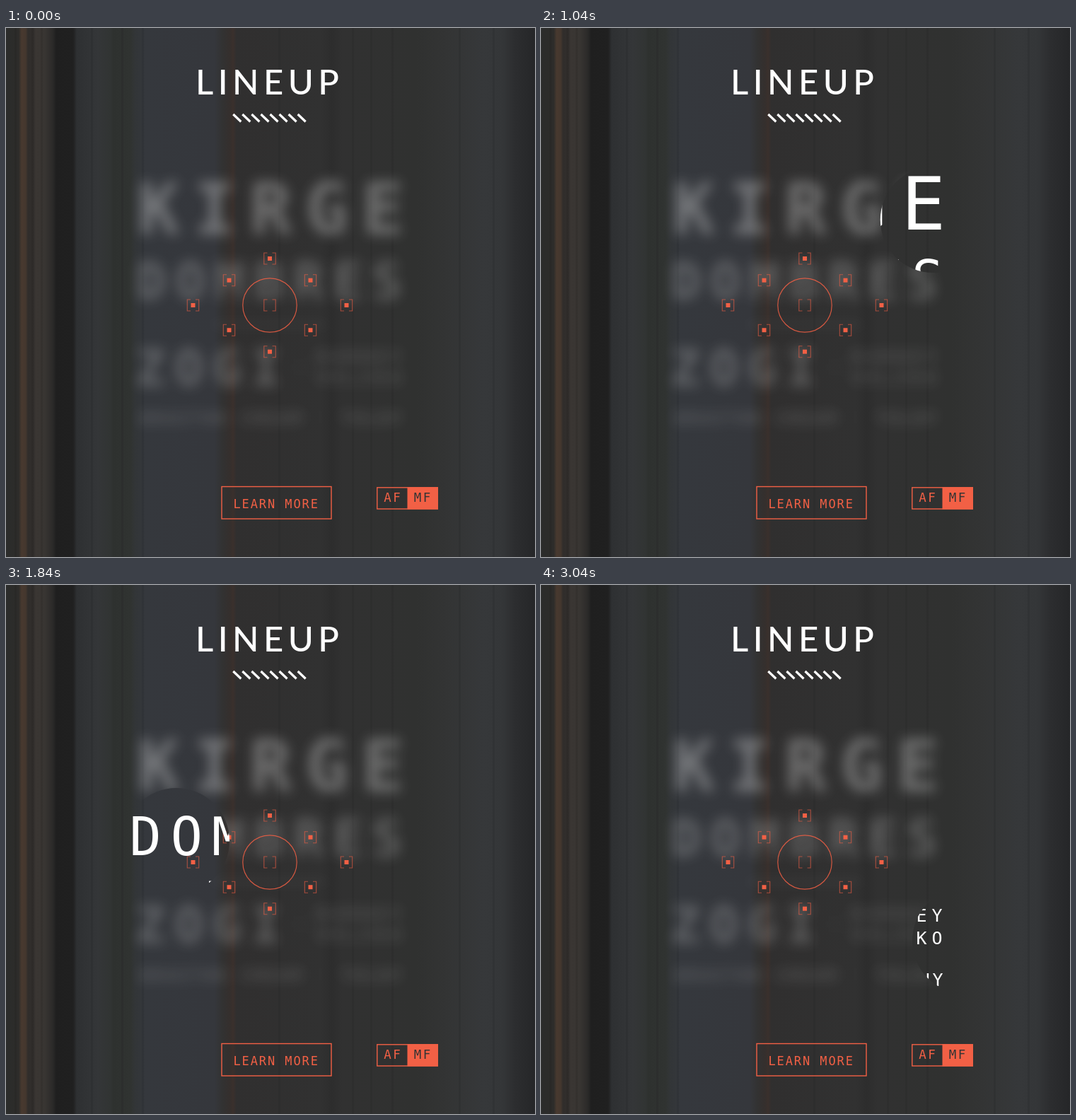
Recreate the animation shown at these times as an HTML page with a canvas. Size 748 px wide and 748 px high, loop 3120 ms.

```html
<!DOCTYPE html>
<html lang="en">
<head>
<meta charset="utf-8">
<title>Lineup</title>
<style>
  html, body { margin: 0; width: 100%; height: 100%; overflow: hidden; background: #303030; }
  canvas { display: block; }
</style>
</head>
<body>
<canvas id="stage" width="748" height="748"></canvas>
<script>
const SIZE = 748, LOOP = 3120, STEP = 80, LENS = 75;
const MONO = '"DejaVu Sans Mono", monospace';
const ORANGE = '#f26045';
const stage = document.getElementById('stage').getContext('2d');

function layer() {
  const c = document.createElement('canvas');
  c.width = c.height = SIZE;
  return c.getContext('2d');
}

// Letters centred on an even pitch, starting at centre x
function row(g, text, x, y, pitch, size, weight = 400) {
  g.font = `${weight} ${size}px ${MONO}`;
  g.textAlign = 'center';
  [...text].forEach((ch, i) => g.fillText(ch, x + i * pitch, y));
}

function poster(g, weight, shade) {
  const ink = a => { g.fillStyle = `rgba(255,255,255,${shade ? a : 1})`; };
  ink(0.32);
  row(g, 'KIRGE', 208, 285, 83.2, 104, weight);
  ink(0.24);
  row(g, 'DOMBRES', 197, 381.5, 58.3, 75, weight);
  row(g, 'ZOGI', 196, 509.5, 57, 72, weight);
  ink(0.2);
  row(g, 'DORNEY', 450, 476, 22, 25, weight);
  row(g, 'VELIKO', 450, 508, 22, 25, weight);
  row(g, 'BRASTON CREAM', 188, 567, 18.65, 25, weight);
  row(g, 'TOLNY', 486.4, 567, 18.65, 25, weight);
  ink(0.16);
  g.fillRect(287, 418.5, 172, 2.5);
  g.fillRect(416, 471, 2, 24);
  g.fillRect(448, 548, 1.5, 19);
}

function backdrop(g) {
  const stops = [
    [0, '#2b2c2b'], [18, '#2d2c2a'], [22, '#48392f'], [28, '#44372e'],
    [31, '#302d2b'], [39, '#312e2c'], [42, '#3a3633'], [55, '#383532'],
    [66, '#2b2a29'], [71, '#1f1f1f'], [95, '#202020'], [100, '#2e3032'],
    [130, '#343638'], [148, '#313433'], [152, '#2e312f'], [176, '#303331'],
    [182, '#323537'], [198, '#35383d'], [295, '#35373c'], [306, '#323232'],
    [317, '#352f2d'], [321, '#3a302c'], [326, '#302f2f'], [445, '#313131'],
    [460, '#2d2d2d'], [476, '#313131'], [580, '#303130'], [622, '#333434'],
    [676, '#36383a'], [702, '#343638'], [718, '#2d2e30'], [748, '#252628']
  ];
  const fill = g.createLinearGradient(0, 0, SIZE, 0);
  stops.forEach(([x, c]) => fill.addColorStop(x / SIZE, c));
  g.fillStyle = fill;
  g.fillRect(0, 0, SIZE, SIZE);
  g.fillStyle = 'rgba(0,0,0,0.07)';
  for (const x of [12, 36, 49, 120, 163, 192, 385, 489, 515, 545, 640, 688]) g.fillRect(x, 0, 3, SIZE);
}

function heading(g) {
  g.fillStyle = g.strokeStyle = '#fff';
  g.font = '500 49px Lato, sans-serif';
  g.textAlign = 'left';
  const text = 'LINEUP';
  const gap = (203 - g.measureText(text).width) / (text.length - 1);
  let x = 268;
  for (const ch of text) {
    g.fillText(ch, x, 94);
    x += g.measureText(ch).width + gap;
  }
  g.lineWidth = 3.2;
  for (let i = 0; i < 8; i++) {
    const left = 321.3 + i * 13.05;
    g.beginPath();
    g.moveTo(left, 122);
    g.lineTo(left + 11, 132.5);
    g.stroke();
  }
}

function bracket(g, x, y, dot) {
  g.strokeStyle = 'rgba(242,96,69,0.62)';
  g.lineWidth = 1.1;
  for (const s of [-1, 1]) {
    g.beginPath();
    g.moveTo(x + s * 3.5, y - 8);
    g.lineTo(x + s * 8.2, y - 8);
    g.lineTo(x + s * 8.2, y + 8);
    g.lineTo(x + s * 3.5, y + 8);
    g.stroke();
  }
  if (dot) {
    g.fillStyle = ORANGE;
    g.fillRect(x - 3, y - 3, 6, 6);
  }
}

function finder(g) {
  const cx = 373, cy = 392;
  bracket(g, cx, cy, false);
  bracket(g, cx, 326, true);
  bracket(g, cx, 457.7, true);
  for (const s of [-1, 1]) {
    bracket(g, cx + s * 108.5, cy, true);
    bracket(g, cx + s * 57.5, 356.7, true);
    bracket(g, cx + s * 57.5, 427.2, true);
  }
  g.strokeStyle = 'rgba(242,96,69,0.85)';
  g.lineWidth = 1.2;
  g.beginPath();
  g.arc(cx, cy, 38.2, 0, 7);
  g.stroke();
}

function buttons(g) {
  g.strokeStyle = g.fillStyle = ORANGE;
  g.lineWidth = 1.4;
  g.strokeRect(305, 648.5, 155, 45.5);
  row(g, 'LEARN MORE', 326.5, 678.5, 12.15, 17);
  g.strokeRect(524.8, 649.8, 85.5, 30.2);
  g.fillRect(567.5, 649.2, 43.5, 31.4);
  row(g, 'AF', 539.5, 670, 13, 17.5);
  g.fillStyle = '#343434';
  row(g, 'MF', 582, 670, 13, 17.5);
}

const base = layer(), ui = layer(), sharp = layer(), soft = layer(), haze = layer();
backdrop(base);
heading(ui);
finder(ui);
buttons(ui);
poster(sharp, 400, false);

// The unfocused copy lies slightly smaller around the middle
soft.translate(373, 410);
soft.scale(0.953, 0.953);
soft.translate(-373, -410);
poster(soft, 700, true);
haze.filter = 'blur(9px)';
haze.drawImage(soft.canvas, 0, 0);

// Lens route: time, x, y
const route = [
  [0, -10, 213], [400, 221, 225], [800, 450, 239], [1060, 558, 275],
  [1280, 510, 335], [1560, 370, 350], [1840, 241, 362], [2080, 155, 412],
  [2320, 185, 478], [2640, 365, 495], [3040, 600, 503], [3120, 647, 505]
];

function slope(i, k) {
  const a = route[Math.max(i - 1, 0)], b = route[Math.min(i + 1, route.length - 1)];
  return (b[k] - a[k]) / (b[0] - a[0]);
}

function lensAt(t) {
  let i = 0;
  while (t >= route[i + 1][0]) i++;
  const a = route[i], b = route[i + 1], span = b[0] - a[0];
  const u = (t - a[0]) / span, v = 1 - u;
  return [1, 2].map(k =>
    a[k] * (1 + 2 * u) * v * v + slope(i, k) * span * u * v * v +
    b[k] * u * u * (3 - 2 * u) - slope(i + 1, k) * span * u * u * v);
}

function clipped(image, x, y, outside) {
  stage.save();
  stage.beginPath();
  if (outside) stage.rect(0, 0, SIZE, SIZE);
  stage.moveTo(x + LENS, y);
  stage.arc(x, y, LENS, 0, Math.PI * 2);
  stage.clip('evenodd');
  stage.drawImage(image.canvas, 0, 0);
  stage.restore();
}

let start = null;
function draw(now) {
  if (start === null) start = now;
  const t = Math.floor(((now - start) % LOOP) / STEP) * STEP;
  const [x, y] = lensAt(t);
  stage.drawImage(base.canvas, 0, 0);
  clipped(haze, x, y, true);
  stage.drawImage(ui.canvas, 0, 0);
  clipped(sharp, x, y, false);
  requestAnimationFrame(draw);
}
requestAnimationFrame(draw);
</script>
</body>
</html>
```
